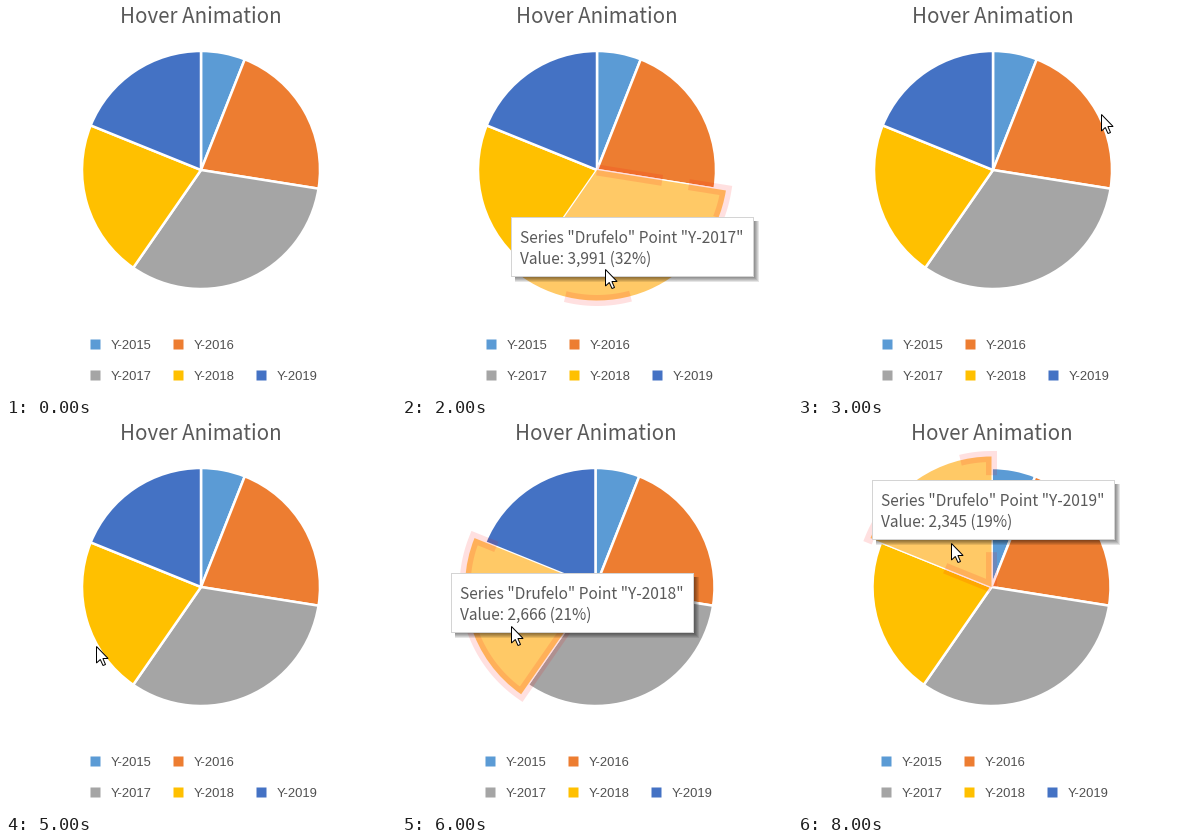
Recreate the animation shown at these times as a matplotlib script. Size 390 by 389 pixels, loop 9000 ms.

```python
import numpy as np
import matplotlib.pyplot as plt
from matplotlib.animation import FuncAnimation
from matplotlib.patches import Polygon, Rectangle, Wedge

W, H, DPI = 390, 389, 64
PT = 72 / DPI  # points per pixel
CX, CY, R, R_HOVER = 195, 164, 119, 130.5
PEN = 11

YEARS = [f"Y-{y}" for y in range(2015, 2020)]
VALUES = np.array([744, 2672, 3991, 2666, 2345])
COLORS = ["#5b9bd5", "#ed7d31", "#a5a5a5", "#ffc000", "#4472c4"]
TOTAL = VALUES.sum()
BOUNDS = np.concatenate([[0], np.cumsum(VALUES)]) / TOTAL * 360 - 90

# outline dashes: on, off, ... in pixels along the slice's edge
MIXED, LONG, SHORT = (66, 27, 66, 122, 66, 200), (330, 200), (50, 77)
# cursor, hovered slice, tooltip corner, outline dashes, horizontal shift
STEPS = [
    (None, None, None, None, 0),
    ((230, 282), None, None, None, 0),
    ((203, 263), 2, (109, 211), MIXED, 0),
    ((303, 108), None, None, None, 0),
    ((250, 126), 1, (94, 74), MIXED, 0),
    ((90, 223), None, None, None, 0),
    ((109, 203), 3, (49, 150), LONG, -1.5),
    ((134, 59), None, None, None, -1.5),
    ((153, 120), 4, (74, 57), SHORT, -1.5),
]
ARROW = np.array([(0, 0), (0, 16.5), (3.8, 13), (6.5, 19), (9, 18),
                  (6.4, 12), (11.6, 12)])

plt.rcParams["font.family"] = "Noto Sans CJK JP"
fig = plt.figure(figsize=(W / DPI, H / DPI), dpi=DPI, facecolor="white")
ax = fig.add_axes([0, 0, 1, 1])


def text(x, y, s, px, color="#595959", **kw):
    ax.text(x, y, s, fontsize=px * PT, color=color, va="baseline", **kw)


def rect(x, y, w, h, color, **kw):
    ax.add_patch(Rectangle((x, y), w, h, facecolor=color, lw=0, **kw))


def slice_(i, cx, radius, color, edge=2.5):
    ax.add_patch(Wedge((cx, CY), radius, BOUNDS[i], BOUNDS[i + 1],
                       facecolor=color, edgecolor="white", lw=edge * PT,
                       joinstyle="round"))


def hover(i, cx, dashes):
    slice_(i, cx, R_HOVER, "#ffc966", edge=0)
    a = np.radians(np.linspace(BOUNDS[i], BOUNDS[i + 1], 80))
    x = np.r_[cx, cx + R_HOVER * np.cos(a), cx]
    y = np.r_[CY, CY + R_HOVER * np.sin(a), CY]
    ax.plot(x, y, color="red", alpha=0.12, lw=PEN * PT,
            ls=(0, tuple(d / PEN for d in dashes)),
            dash_capstyle="butt", dash_joinstyle="miter")


def tooltip(i, x, y):
    w, h = 243, 60
    for k in range(5):
        rect(x + 4, y + 4, w + 1 - k, h + 1 - k, "black", alpha=0.1,
             zorder=2.5)
    rect(x, y, w, h, "#d4d4d4", zorder=2.5)
    rect(x + 1, y + 1, w - 2, h - 2, "white", zorder=2.5)
    share = VALUES[i] / TOTAL
    text(x + 9, y + 26, f'Series "Drufelo" Point "{YEARS[i]}"', 15.5)
    text(x + 9, y + 47, f"Value: {VALUES[i]:,} ({share:.0%})", 15.5)


def legend(dx):
    for i, (year, color) in enumerate(zip(YEARS, COLORS)):
        row, col = (0, i) if i < 2 else (1, i - 2)
        x, y = 84 + 83 * col + dx, 333 + 31 * row
        rect(x + 0.5, y + 0.5, 10, 10, color, snap=False)
        text(x + 21, y + 10, year, 13, "#505050", family="Liberation Sans")


def draw(n):
    cursor, hot, tip, dashes, dx = STEPS[n]
    ax.clear()
    ax.set(xlim=(0, W), ylim=(H, 0))
    ax.axis("off")
    text(CX + int(dx), 17, "Hover Animation", 20.5, ha="center")
    for i, color in enumerate(COLORS):
        slice_(i, CX + dx, R, color)
    legend(int(dx))
    if hot is not None:
        hover(hot, CX + dx, dashes)
        tooltip(hot, *tip)
    if cursor:
        ax.add_patch(Polygon(ARROW + cursor + 0.5, facecolor="white",
                             edgecolor="black", lw=PT, zorder=5))
    return []


anim = FuncAnimation(fig, draw, frames=len(STEPS), interval=1000,
                     repeat=True, repeat_delay=0, init_func=lambda: [])
plt.show()
```
